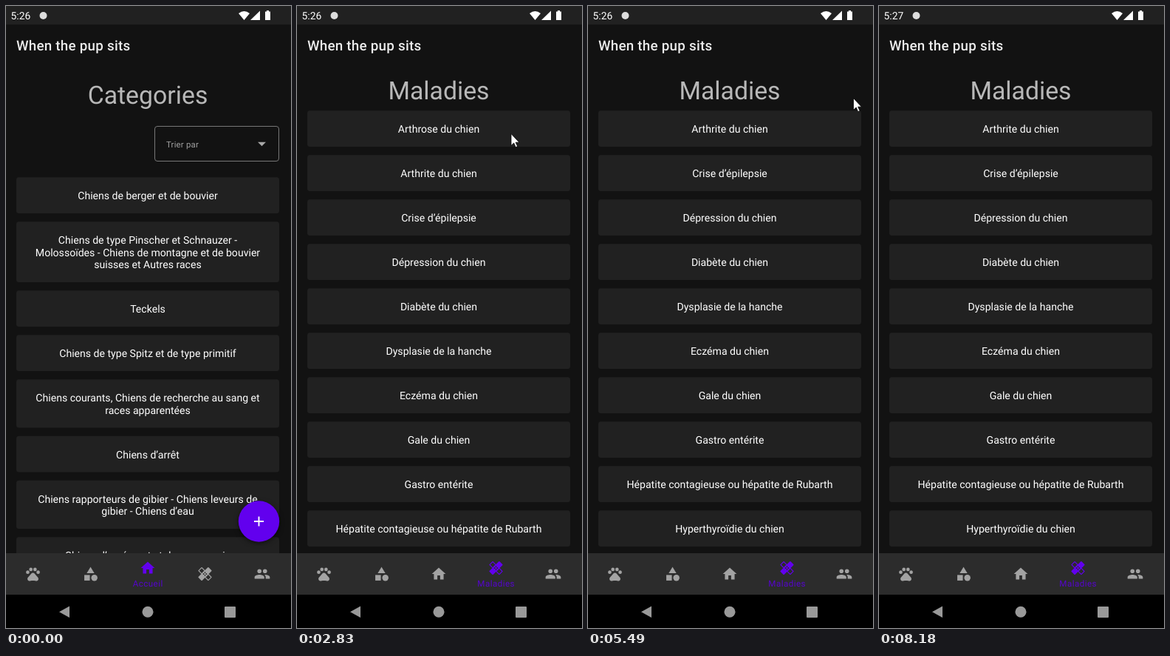
Recreate the animation shown at these times as an HTML page. Size 386x840 px, loop 8420 ms.

```html
<!DOCTYPE html>
<html lang="fr">
<head>
<meta charset="utf-8">
<title>When the pup sits</title>
<style>
  html, body { margin: 0; width: 100%; height: 100%; overflow: hidden; background: #121212; }
  svg { display: block; width: 100vw; height: 100vh; font-family: Roboto, "Noto Sans", sans-serif; }
  text { text-rendering: geometricPrecision; }
</style>
</head>
<body>
<svg id="stage" viewBox="0 0 386 840"></svg>
<script>
const LOOP = 8420;
const PURPLE = '#6200ee', GREY = '#a3a3a3';
const TAB_SWITCH = 1690, OPEN = 3230, CLOSE = 4790, REMOVE = 5130, MINUTE = 6700;
const stage = document.getElementById('stage');

const text = (x, y, size, fill, str, extra = '') =>
  `<text x="${x}" y="${y}" font-size="${size}" fill="${fill}" ${extra}>${str}</text>`;
const middle = 'text-anchor="middle"';
const group = (id, body, extra = '') => `<g id="${id}" ${extra}>${body}</g>`;
const icon = (x, y, body, scale = .939, fill = GREY) =>
  `<g transform="translate(${x} ${y}) scale(${scale}) translate(-12 -12)" fill="${fill}">${body}</g>`;
const path = (d, extra = '') => `<path d="${d}" ${extra}/>`;
const caret = y => path(`M341 ${y}h11l-5.5 5.5z`, 'fill="#a8a8a8"');
const outline = (x, y, w, h) =>
  `<rect x="${x}" y="${y}" width="${w}" height="${h}" rx="3.5" fill="none" stroke="#777"/>`;

// A button card whose height follows its number of lines.
const LINE = 16.5, GAP = 11.2;
function card(y, lines) {
  const height = 32.3 + LINE * lines.length;
  const first = y + 29.9;
  const rows = lines.map((s, i) => text(192, first + i * LINE, 14.08, '#fff', s, middle)).join('');
  return { height, svg: `<rect x="14" y="${y}" width="356" height="${height}" rx="3.5" fill="#212121"/>${rows}` };
}
function cards(y, items) {
  return items.map(item => {
    const c = card(y, item.split('|'));
    y += c.height + GAP;
    return c.svg;
  }).join('');
}

const categories = [
  'Chiens de berger et de bouvier',
  'Chiens de type Pinscher et Schnauzer -|Molossoïdes - Chiens de montagne et de bouvier|suisses et Autres races',
  'Teckels',
  'Chiens de type Spitz et de type primitif',
  'Chiens courants, Chiens de recherche au sang et|races apparentées',
  'Chiens d’arrêt',
  'Chiens rapporteurs de gibier - Chiens leveurs de|gibier - Chiens d’eau',
  'Chiens d’agrément et de compagnie'
];
const diseases = [
  'Arthrose du chien', 'Arthrite du chien', 'Crise d’épilepsie', 'Dépression du chien',
  'Diabète du chien', 'Dysplasie de la hanche', 'Eczéma du chien', 'Gale du chien',
  'Gastro entérite', 'Hépatite contagieuse ou hépatite de Rubarth', 'Hyperthyroïdie du chien'
];
const description = [
  'L’arthrose est une pathologie très courante', 'chez le chien adulte.', '',
  'La dégradation progressive du cartilage des', 'articulations en laissant place à un tissu',
  'osseux anormal est responsable de cette', 'affection (le cartilage abîmé ne joue plus',
  'son rôle d’amortisseur et laisse la place à', 'des chocs douloureux).', '',
  'Si l’arthrose est généralement liée à l’âge,', 'on observe que des traumatismes',
  'successifs, l’obésité, la malformation', 'congénitale et la dysplasie de naissance',
  'peuvent aussi affecter les jeunes chiens.', '',
  'Certaines races, en particulier les grands', 'chiens, sont plus sujettes à l’arthrose en',
  'raison de leur morphologie et de leur', 'poids.'
];

const heading = (y, s) => text(192, y, 33.8, '#b8b8b8', s, middle);

const categoryPage = heading(132, 'Categories') +
  outline(201.5, 162.5, 168, 47) +
  text(217, 190.5, 11.4, '#a0a0a0', 'Trier par', 'letter-spacing=".2"') + caret(183.7) +
  cards(231.3, categories) +
  `<circle cx="342.5" cy="696" r="27.7" fill="${PURPLE}" style="filter:drop-shadow(0 2px 3px #0008)"/>` +
  path('M342.5 689.5v13M336 696h13', 'stroke="#fff" stroke-width="1.9"');

const syringe = `<g transform="translate(146 188) rotate(-45)">
  <path d="M-24 0h10M13 0h10" stroke="#9aa5ab" stroke-width="2"/>
  <rect x="-14" y="-5.5" width="27" height="11" rx="2" fill="#a9b7bd"/>
  <path d="M-6-5v5M-1-5v5M4-5v5" stroke="#5f7078"/>
  <path d="M22-5v10" stroke="#5b7f3a" stroke-width="3"/></g>
  <path d="M130 173l32 30M162 173l-32 30" stroke="#c9473a" stroke-width="4.8"/>`;
const pouting = `<path d="M222 207q0-13 16-13t16 13z" fill="#d9822b"/>
  <path d="M224 199q-2-28 14-28t14 28q-14 6-28 0z" fill="#7a4526"/>
  <ellipse cx="238" cy="188" rx="11.5" ry="13" fill="#c9681f"/>
  <path d="M226 183q2-10 12-10t12 10q-7-1-12-6-4 5-12 6z" fill="#7a4526"/>
  <path d="M229 179l8 6M247 179l-8 6" stroke="#d93a2e" stroke-width="2.5"/>
  <circle cx="233" cy="188" r="1.6" fill="#432b20"/><circle cx="243" cy="188" r="1.6" fill="#432b20"/>
  <path d="M233 196q5-4 10 0" fill="none" stroke="#512d1e" stroke-width="1.6"/>`;

const detailPage =
  icon(26, 122, path('M20 11H7.83l5.59-5.59L12 4l-8 8 8 8 1.41-1.41L7.83 13H20z'), 1, '#b5b5b5') +
  text(192, 131, 23.47, '#fff', 'Arthrose du chien', middle) +
  path('M41 139.5H342.5', 'stroke="#b0b0b0"') +
  icon(358, 119.7, path('M6 19c0 1.1.9 2 2 2h8c1.1 0 2-.9 2-2V7H6zM19 4h-3.5l-1-1h-5l-1 1H5v2h14z'), 1.02) +
  syringe + pouting +
  outline(14.5, 230.5, 355, 58) +
  text(30, 270, 29.8, '#a0a0a0', 'Description') + caret(257) +
  description.map((s, i) => text(18, 317.2 + i * 20.9, 17.84, '#fff', s)).join('') +
  '<rect x="366.2" y="96" width="3.8" height="165.5" fill="#707070"/>';

const tabs = [
  { x: 36.5, art: '<circle cx="4.5" cy="9.5" r="2.5"/><circle cx="9" cy="5.5" r="2.5"/><circle cx="15" cy="5.5" r="2.5"/><circle cx="19.5" cy="9.5" r="2.5"/>' +
      path('M17.3 14.9l-2.5-2.9Q13.5 10.5 12 10.5T9.2 12l-2.5 2.9C5.4 16.2 3.8 17.6 4.1 19.6q.5 2 2.3 2.4c.8.1 3.1-.5 5.6-.5s4.8.6 5.6.5q1.8-.4 2.3-2.4c.3-2-1.3-3.4-2.6-4.7z') },
  { x: 114.5, art: path('M12 2l-5.5 9h11z') + '<circle cx="17.5" cy="17.5" r="4.5"/><path d="M3 13.5h8v8H3z"/>' },
  { x: 192, label: 'Accueil', art: path('M10 20v-6h4v6h5v-8h3L12 3 2 12h3v8z') },
  { x: 269.5, label: 'Maladies', art: `<g transform="rotate(45 12 12)">
      <rect x="8.2" y="1.6" width="7.6" height="20.8" rx="1"/><rect x="1.6" y="8.2" width="20.8" height="7.6" rx="1"/>
      <path d="M2.8 9.45h5.1v5.1H2.8zM16.1 9.45h5.1v5.1h-5.1z" fill="#2c2c2c"/>
      <path d="M10.6 10.6h.01M13.4 10.6h.01M10.6 13.4h.01M13.4 13.4h.01" stroke="#2c2c2c" stroke-width="1.9" stroke-linecap="round"/></g>` },
  { x: 347, art: '<circle cx="8" cy="8" r="3"/><circle cx="16" cy="8" r="3"/>' +
      path('M8 13c-2.3 0-7 1.2-7 3.5V19h14v-2.5c0-2.3-4.7-3.5-7-3.5zm8 0l-1 .1c1.2.8 2 1.9 2 3.4V19h6v-2.5c0-2.3-4.7-3.5-7-3.5z') }
];
const navBar = '<rect y="739" width="386" height="56" fill="#2c2c2c"/>' +
  '<circle id="ripple" cx="269.5" cy="767" r="0" fill="#444" clip-path="url(#navClip)"/>' +
  tabs.map((tab, i) => group('tab' + i, icon(tab.x, 767, tab.art, .939, 'inherit'), `fill="${GREY}"`) +
    (tab.label ? text(tab.x + .2, 784, 11.6, GREY, tab.label, `id="label${i}" ${middle} letter-spacing=".45"`) : '')).join('');

const systemBar = '<rect y="795" width="386" height="45"/>' +
  `<g fill="#999"><path d="M72 818.3l14-7.7v15.4z"/><circle cx="192" cy="818.3" r="7.5"/>
   <rect x="296" y="811" width="15" height="15" rx="1"/></g>`;

const statusBar = '<rect width="386" height="25" fill="#212121"/>' +
  text(6.6, 18, 13.8, '#fff', '5:26', 'id="clock"') +
  '<circle cx="50.5" cy="13" r="5" fill="#ddd"/>' +
  path('M315 10q7.5-6 15 0l-7.5 9zM331 19l13-12.5V19zM353 7.5V6h3v1.5h2V19h-7V7.5z', 'fill="#fff"') +
  text(14, 60, 18.78, '#ececec', 'When the pup sits', 'font-weight="500" letter-spacing=".25"');

const diseasePage = heading(126, 'Maladies') +
  group('allRows', cards(141.2, diseases.slice(0, 10))) + group('fewerRows', cards(141.2, diseases.slice(1)));

stage.innerHTML = '<clipPath id="navClip"><rect y="739" width="386" height="56"/></clipPath>' +
  '<rect width="386" height="840" fill="#121212"/>' +
  group('categoryPage', categoryPage) + group('diseasePage', diseasePage) + group('detailPage', detailPage) +
  statusBar + navBar + systemBar +
  group('cursor', path('M0 0V16l3.7-3.5 2.5 5.7 2.5-1.1-2.5-5.4H11z', 'fill="#fff" stroke="#000" stroke-width=".8"'));

const $ = id => document.getElementById(id);
const show = (id, on) => $(id).setAttribute('display', on ? 'inline' : 'none');
const set = (id, name, value) => $(id).setAttribute(name, value);
const progress = (t, from, to) => Math.min(1, Math.max(0, (t - from) / (to - from)));
const smooth = p => p * p * (3 - 2 * p);

// Pointer stops: time, x, y. Equal neighbours are rests.
const stops = [
  [370, 228, 840], [1070, 281, 752], [1450, 281, 752], [1650, 276.5, 766], [1850, 276.5, 766],
  [2110, 280, 587], [2850, 290, 172], [3790, 290, 172], [4490, 359.5, 124.5], [5490, 359.5, 124.5],
  [6330, 192, 154], [6430, 161, 163], [6700, 140, 165], [7160, 226, 176], [7620, 226, 176], [8180, 351, -19]
];
function slope(i, axis) {
  const a = stops[i - 1], b = stops[i], c = stops[i + 1];
  if (!a || !c) return 0;
  const before = b[axis] - a[axis], after = c[axis] - b[axis];
  return before * after <= 0 ? 0 : (before + after) / (c[0] - a[0]);
}
function pointer(t, axis) {
  const i = Math.max(0, stops.findIndex((s, k) => k < stops.length - 1 && t < stops[k + 1][0]));
  const a = stops[i], b = stops[i + 1], span = b[0] - a[0];
  const p = progress(t, a[0], b[0]), q = 1 - p;
  return a[axis] * q * q * (1 + 2 * p) + b[axis] * p * p * (1 + 2 * q) +
    span * p * q * (q * slope(i, axis) - p * slope(i + 1, axis));
}

function render(t) {
  const detail = t >= OPEN && t < CLOSE;
  show('categoryPage', t < TAB_SWITCH);
  show('detailPage', detail);
  show('diseasePage', t >= TAB_SWITCH && !detail);
  show('allRows', t < REMOVE);
  show('fewerRows', t >= REMOVE);
  $('clock').textContent = t < MINUTE ? '5:26' : '5:27';

  const picked = t >= 1640;
  const shift = smooth(progress(t, 1660, 1790));
  set('tab2', 'fill', picked ? GREY : PURPLE);
  set('tab3', 'fill', picked ? PURPLE : GREY);
  set('tab2', 'transform', `translate(0 ${-8 * (1 - shift)})`);
  set('tab3', 'transform', `translate(0 ${-8 * shift})`);
  set('label2', 'fill', picked ? GREY : '#5604cf');
  set('label3', 'fill', '#5604cf');
  set('label2', 'opacity', 1 - shift);
  set('label3', 'opacity', shift);
  set('ripple', 'r', 48 * smooth(progress(t, 1660, 1960)));
  set('ripple', 'opacity', 1 - progress(t, 2130, 2420));

  show('cursor', t >= 370 && t < 8180);
  set('cursor', 'transform', `translate(${pointer(t, 1)} ${pointer(t, 2)})`);
}

const start = performance.now();
function tick() {
  render((performance.now() - start) % LOOP);
  requestAnimationFrame(tick);
}
tick();
</script>
</body>
</html>
```
